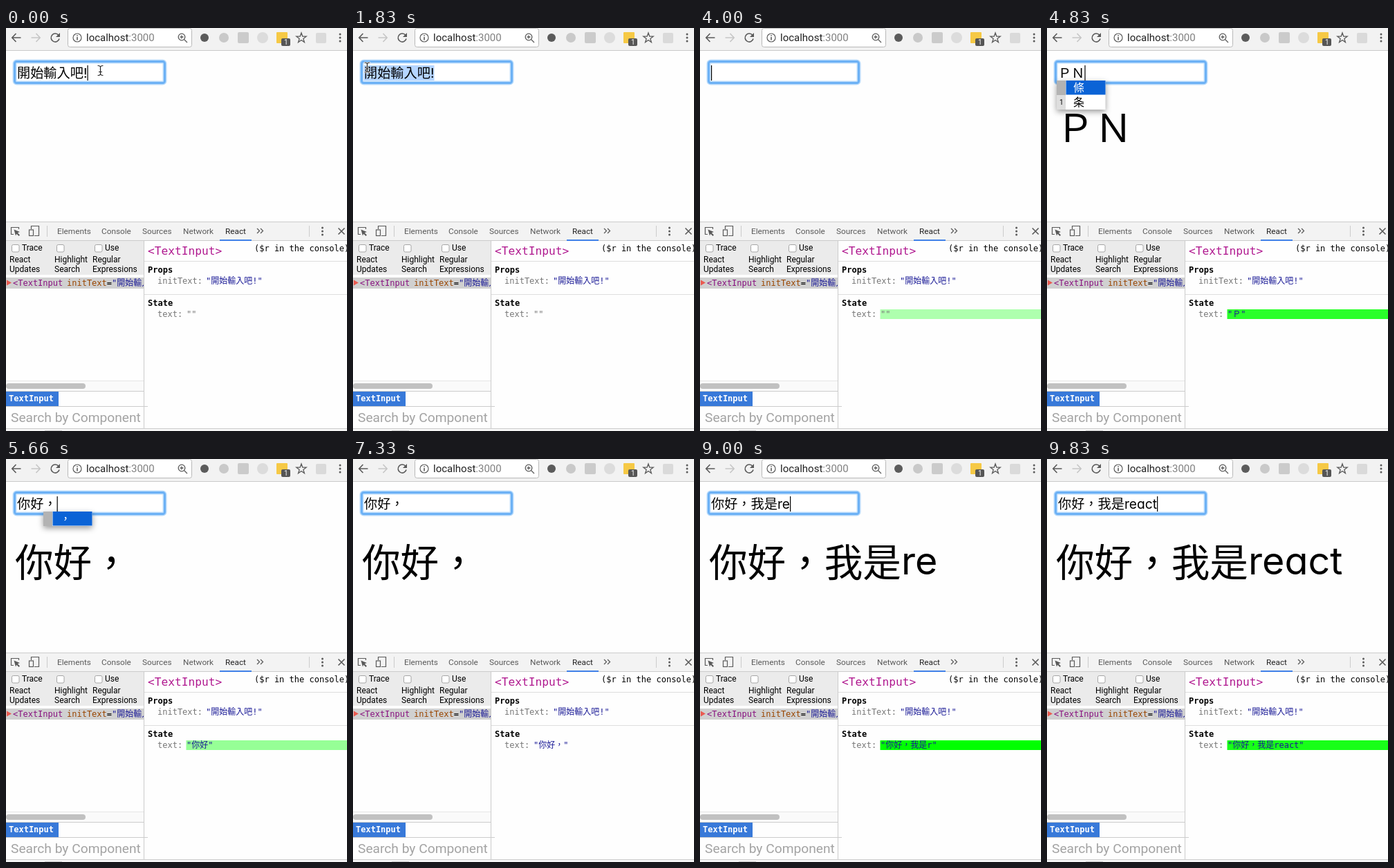
Animation, 493 px wide and 583 px high, one loop 10000 ms. Source, as an HTML page:

```html
<!DOCTYPE html>
<html lang="zh-Hant">
<head>
<meta charset="utf-8">
<title>TextInput demo</title>
<style>
html, body { margin: 0; width: 100%; height: 100%; overflow: hidden; background: #fefefe; }
svg { display: block; }
text { font-family: Roboto, "Noto Sans CJK TC", sans-serif; white-space: pre; }
.ui { font-size: 12px; fill: #000; }
.tab { font-size: 11.8px; fill: #5a5a5a; }
.mono { font: 12px "DejaVu Sans Mono", "Noto Sans CJK TC", monospace; }
.bold { font-weight: 700; }
.key { fill: #777; }
.str { fill: #1a1a96; }
.field, .title { font-family: Inter, "Noto Sans CJK TC", "Noto Sans CJK JP", sans-serif; font-feature-settings: "cv11"; }
.field { font-size: 19.2px; }
.title { font-size: 55.6px; }
.cjk { font-weight: 500; }
.pick { font: 16px "Noto Sans CJK TC", "Noto Sans CJK JP", sans-serif; }
.line { fill: none; stroke: #5a5a5a; stroke-width: 1.6; }
.rule { stroke: #ccc; }
.box { fill: #fff; stroke: #a5a5a5; }
#menu { filter: drop-shadow(0 3px 4px rgba(0, 0, 0, .4)); }
</style>
</head>
<body>
<svg width="493" height="583" viewBox="0 0 493 583">
  <rect width="493" height="583" fill="#fefefe"/>

  <!-- browser bar -->
  <rect width="493" height="32" fill="#f2f2f2"/>
  <path d="M0 32.5H493" stroke="#c9c9c9"/>
  <path class="line" d="M21.5 14H9M14.5 8L8.8 14L14.5 20"/>
  <path class="line" style="stroke:#c6c6c6" d="M36.5 14H49M43.5 8L49.2 14L43.5 20"/>
  <path class="line" d="M76 10.5A6 6 0 1 0 77 15.5"/>
  <path d="M78 7V13H72Z" fill="#5a5a5a"/>
  <rect x="89.5" y="0.5" width="179" height="27" rx="3" fill="#fff" stroke="#b9b9b9"/>
  <circle class="line" style="stroke-width:1.2" cx="103" cy="14" r="6"/>
  <path class="line" d="M103 13V17.5M103 10.2V11.8"/>
  <text x="116" y="19" font-size="15" fill="#222">localhost<tspan fill="#808080">:3000</tspan></text>
  <circle class="line" style="stroke-width:1.3" cx="254" cy="13" r="4.8"/>
  <path class="line" style="stroke-width:1.3" d="M257.5 16.5L262 21M251.5 13H256.5M254 10.5V15.5"/>
  <circle cx="287" cy="14" r="6" fill="#5b5b5b"/>
  <circle cx="315" cy="14" r="7" fill="#c9c9c9"/>
  <rect x="335" y="6" width="16" height="16" rx="2" fill="#cbcbcb"/>
  <circle cx="371" cy="14" r="8" fill="#dcdcdc"/>
  <rect x="391" y="6" width="16" height="16" rx="1" fill="#f6c945"/>
  <rect x="398" y="15" width="13" height="11" rx="2" fill="#555"/>
  <text x="402" y="24" font-size="10" fill="#fff">1</text>
  <path id="star" class="line" style="stroke-width:1.3"/>
  <rect x="448" y="7" width="15" height="15" rx="2" fill="#dadada"/>
  <g fill="#5a5a5a">
    <circle cx="483" cy="9" r="1.5"/><circle cx="483" cy="14" r="1.5"/><circle cx="483" cy="19" r="1.5"/>
  </g>

  <!-- page -->
  <rect x="12.5" y="48.5" width="217" height="31" rx="3" fill="#fff" stroke="#b9dbfb" stroke-width="6"/>
  <rect x="12.5" y="48.5" width="217" height="31" rx="3" fill="none" stroke="#6cb1f5" stroke-width="3"/>
  <rect id="sel" y="54" height="22" fill="#b5d5ff"/>
  <text id="field" class="field" x="16" y="72"></text>
  <rect id="caret" y="54" width="1.2" height="22"/>
  <text id="title" class="title" x="13" y="165"></text>
  <g id="menu"></g>
  <g id="beam" fill="none" stroke-linecap="round">
    <path d="M-3.5 -7Q0 -7 0 -4.5Q0 -7 3.5 -7M0 -5V5M-3.5 7Q0 7 0 4.5Q0 7 3.5 7M-2 2H2" stroke="#fff" stroke-width="2.6"/>
    <path d="M-3.5 -7Q0 -7 0 -4.5Q0 -7 3.5 -7M0 -5V5M-3.5 7Q0 7 0 4.5Q0 7 3.5 7M-2 2H2" stroke="#222" stroke-width="1.2"/>
  </g>

  <!-- devtools bar -->
  <rect y="280" width="493" height="28" fill="#f3f3f3"/>
  <path class="rule" d="M0 280.5H493M0 307.5H493M59.5 286V302M438.5 286V302"/>
  <path class="line" style="stroke-width:1.2" d="M11 298.5H7.5V288.5H18.5V291"/>
  <path d="M11.5 291.5L20 295L16.8 296.3L20 299.5L18.5 301L15.3 297.8L14 300.5Z" fill="#5a5a5a"/>
  <path class="line" style="stroke-width:1.2" d="M36.5 291V286.5H47.5V300.5H41"/>
  <rect class="line" style="stroke-width:1.2" x="33.5" y="292" width="6" height="8.5"/>
  <text class="tab" x="74" y="298">Elements</text>
  <text class="tab" x="138" y="298">Console</text>
  <text class="tab" x="197" y="298">Sources</text>
  <text class="tab" x="256" y="298">Network</text>
  <text class="tab" x="317" y="298" style="fill:#222">React</text>
  <rect x="309" y="306" width="46" height="2" fill="#4080e8"/>
  <path class="line" style="stroke-width:1.3" d="M363 290L366.5 293.5L363 297M368 290L371.5 293.5L368 297"/>
  <g fill="#5a5a5a">
    <circle cx="457.5" cy="289" r="1.5"/><circle cx="457.5" cy="294" r="1.5"/><circle cx="457.5" cy="299" r="1.5"/>
  </g>
  <path class="line" d="M480.5 289.5L489.5 298.5M489.5 289.5L480.5 298.5"/>

  <!-- tree pane -->
  <rect y="308" width="199" height="49" fill="#ebebeb"/>
  <rect class="box" x="8.5" y="313.5" width="10.5" height="10.5" rx="2"/>
  <rect class="box" x="73.5" y="313.5" width="10.5" height="10.5" rx="2"/>
  <rect class="box" x="128.5" y="313.5" width="10.5" height="10.5" rx="2"/>
  <text class="ui" x="23" y="322">Trace</text>
  <text class="ui" x="5" y="339">React</text>
  <text class="ui" x="5" y="353">Updates</text>
  <text class="ui" x="70" y="339">Highlight</text>
  <text class="ui" x="70" y="353">Search</text>
  <text class="ui" x="143" y="322">Use</text>
  <text class="ui" x="125" y="339">Regular</text>
  <text class="ui" x="125" y="353">Expressions</text>
  <rect y="361" width="199" height="16" fill="#d0d0d0"/>
  <path d="M1 364.5L8 368.5L1 372.5Z" fill="#ea5a50"/>
  <svg width="199" height="400">
    <text class="mono" x="10" y="373" fill="#881280">&lt;TextInput</text>
    <text class="mono" x="88" y="373"><tspan fill="#994500">initText</tspan>=<tspan class="str">"開始輸入吧!"</tspan></text>
  </svg>
  <rect y="511" width="199" height="14" fill="#fafafa"/>
  <path stroke="#e6e6e6" d="M0 510.5H199"/>
  <rect y="514" width="115" height="8" rx="4" fill="#c1c1c1"/>
  <path class="rule" d="M0 525.5H199"/>
  <rect y="526" width="76" height="21" fill="#3879d9"/>
  <text class="mono bold" x="4" y="540" fill="#fff">TextInput</text>
  <path class="rule" d="M199.5 308V579M0 547.5H205"/>
  <text x="7" y="570" font-size="19.2" fill="#a3a3a3">Search by Component</text>

  <!-- detail pane -->
  <text class="mono" x="205" y="328" style="font-size:16.2px" fill="#b0188f">&lt;TextInput&gt;</text>
  <text class="mono" x="359" y="323">($r in the console)</text>
  <path stroke="#dedede" d="M200 337.5H493M200 385.5H493"/>
  <text class="mono bold" x="205" y="354">Props</text>
  <text class="mono key" x="219" y="370">initText:</text>
  <text class="mono str" x="289" y="370">"開始輸入吧!"</text>
  <text class="mono bold" x="205" y="402">State</text>
  <text class="mono key" x="219" y="418">text:</text>
  <rect id="flash" x="260.5" y="407" width="232.5" height="14" fill="#0f0"/>
  <text id="state" class="mono" x="261" y="418"></text>

  <rect y="579" width="493" height="4" fill="#f6f6f6"/>
  <path class="rule" d="M0 579.5H493M56 582.5H81"/>
</svg>
<script>
const LOOP = 10000, FPS = 6;
const START = "開始輸入吧!", HI = "你好，", ME = HI + "我是";
const $ = id => document.getElementById(id);

// time, field text, [committed characters, candidates...]
const typed = [
  [0, START],
  [2660, "1"], [2830, "12"], [3000, "123"], [3500, "1"], [3660, ""],
  [4660, "Ｐ", [0, "人"]], [4830, "ＰＮ", [0, "條", "条"]], [5000, "你"],
  [5160, "你Ｇ", [1, "女"]], [5330, "你好"],
  [5660, HI, [2, "，"]], [5830, HI],
  [7500, HI + "Ｑ", [3, "手"]], [7660, HI + "我"],
  [7830, HI + "我Ｏ", [4, "日"]], [8000, HI + "我ＯＭ", [4, "是"]], [8160, ME],
  [8830, ME + "r"], [9000, ME + "re"], [9330, ME + "rea"],
  [9500, ME + "reac"], [9660, ME + "react"]
];

// time, component state; each change flashes green
const states = [
  [-2000, ""],
  [2650, "1"], [2820, "12"], [2940, "123"], [3480, "1"], [3600, ""],
  [4690, "Ｐ"], [4850, "ＰＮ"], [4990, "你"], [5180, "你Ｇ"], [5320, "你好"],
  [5840, HI], [7510, HI + "Ｑ"], [7670, HI + "我"], [7840, HI + "我Ｏ"],
  [8170, ME], [8990, ME + "r"], [9150, ME + "re"], [9400, ME + "rea"],
  [9560, ME + "reac"], [9730, ME + "react"]
];

// time, pointer x, y, first selected character
const pointer = [
  [0, 136.5, 61.5, 6], [330, 137, 61, 6], [1000, 126, 60, 6], [1160, 98, 58, 4],
  [1330, 62, 57, 2], [1500, 32, 57, 1], [1660, 12, 57, 0], [1830, 20.5, 57, 0]
];

const at = (rows, t) => rows.findLast(r => r[0] <= t);
const show = (el, on) => el.setAttribute("visibility", on ? "visible" : "hidden");
const set = (el, attrs) => { for (const k in attrs) el.setAttribute(k, attrs[k]); };

// CSS "ease" timing
function ease(x) {
  if (x >= 1) return 1;
  const bez = (a, b, u) => 3 * a * u * (1 - u) ** 2 + 3 * b * u * u * (1 - u) + u ** 3;
  let lo = 0, hi = 1;
  for (let i = 0; i < 20; i++) {
    const mid = (lo + hi) / 2;
    if (bez(.25, .25, mid) < x) lo = mid; else hi = mid;
  }
  return bez(.1, 1, lo);
}

// Han characters sit lower and a little heavier than Latin ones
const mixed = s => s.replace(/[\u4e00-\u9fff，]+|[^\u4e00-\u9fff，]+/g, run =>
  /[\u4e00-\u9fff，]/.test(run)
    ? `<tspan class="cjk" y="169.5">${run}</tspan>`
    : `<tspan y="${/[\uff21-\uff3a1-9]/.test(run) ? 165 : 166.5}">${run}</tspan>`);

function menuMarkup([count, ...words]) {
  const x = 14 + 20 * count;
  return `<rect x="${x}" y="76" width="70.5" height="${words.length * 21}" fill="#fff"/>` +
    words.map((word, i) => {
      const y = 76 + 21 * i;
      return `<rect x="${x}" y="${y}" width="13" height="21" fill="${i ? "#dedede" : "#b3b3b3"}"/>` +
        (i ? `<text x="${x + 4}" y="${y + 14}" font-size="10">${i}</text>`
           : `<rect x="${x + 13.5}" y="${y}" width="57" height="20.5" fill="#0b63d6"/>`) +
        `<text class="pick" x="${x + 24}" y="${y + 16}" fill="${i ? "#000" : "#fff"}">${word}</text>`;
    }).join("");
}

let last = -1;
function draw(now) {
  const tick = Math.min(LOOP * FPS / 1000 - 1, Math.floor((now % LOOP + 7) * FPS / 1000));
  if (tick !== last) {
    last = tick;
    render(Math.floor(tick * 100 / FPS) * 10);
  }
  requestAnimationFrame(() => draw(performance.now()));
}

function render(t) {
  const [since, text, menu] = at(typed, t);
  const [, px, py, from] = at(pointer, t);
  const [changed, value] = at(states, t);
  const idle = t < 2660;
  const selecting = idle && from < 6;

  $("field").textContent = text;
  $("title").innerHTML = idle ? "" : mixed(text);
  const end = 16 + (text ? $("field").getComputedTextLength() : 0);

  $("caret").setAttribute("x", end);
  show($("caret"), !selecting && Math.floor((t - since) / 500) % 2 === 0);
  const left = 16 + 19.2 * from;
  set($("sel"), { x: left, width: Math.max(0, end - left) });
  show($("sel"), selecting);
  $("beam").setAttribute("transform", `translate(${px} ${py})`);
  show($("beam"), idle);
  $("menu").innerHTML = menu ? menuMarkup(menu) : "";

  $("state").textContent = `"${value}"`;
  $("state").setAttribute("fill", value ? "#1a1a96" : "#777");
  $("flash").setAttribute("opacity", 1 - ease((t - changed) / 1000));
}

$("star").setAttribute("d", "M" + Array.from({ length: 10 }, (_, i) => {
  const a = i * Math.PI / 5, r = i % 2 ? 3 : 7.5;
  return `${427 + r * Math.sin(a)} ${14.5 - r * Math.cos(a)}`;
}).join("L") + "Z");

draw(performance.now());
</script>
</body>
</html>
```
